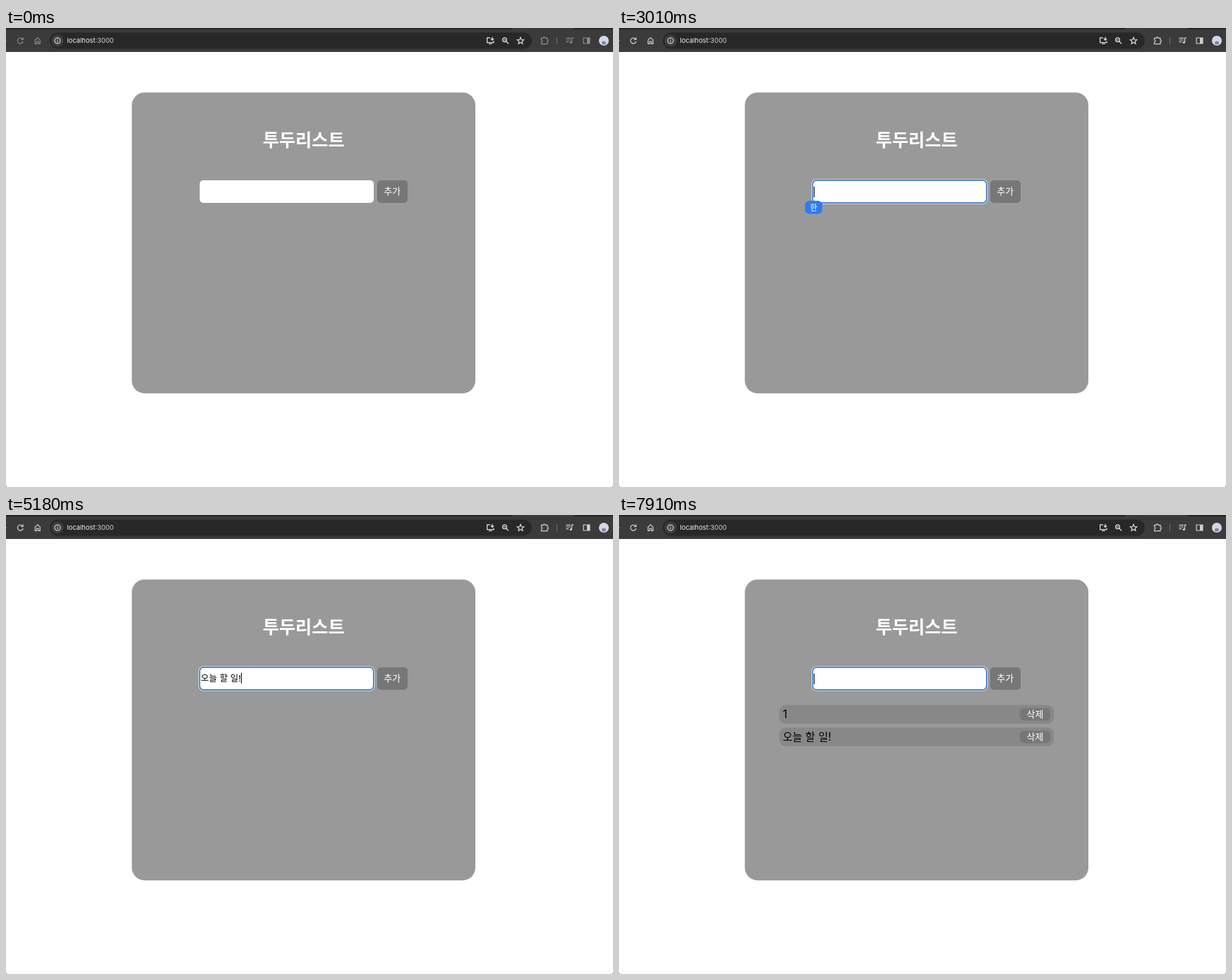
Write an HTML page with a canvas that moves like this. It is 860x651 px and loops after 8 s.

```html
<!DOCTYPE html>
<html lang="ko">
<head>
<meta charset="utf-8">
<title>투두리스트</title>
<style>
  html, body { margin: 0; width: 100%; height: 100%; overflow: hidden; background: #fff; }
  canvas { display: block; }
</style>
</head>
<body>
<canvas id="stage" width="860" height="651"></canvas>
<script>
const ctx = document.getElementById('stage').getContext('2d');
const LOOP = 8000;
const KOREAN = '"Noto Sans CJK KR", "Noto Sans CJK", sans-serif';
const ARIAL = '"Liberation Sans", Arial, sans-serif';
const INTER = 'Inter, sans-serif';

// Typing: [start ms, field text, is the last character being composed]
const typing = [
  [0, ''],
  [2240, 'dh'], [2450, 'dhsm'], [2590, 'dhs'], [2660, 'dh'], [2730, 'd'], [2800, ''],
  [3220, 'ㅇ', true], [3570, '오', true], [3780, '온', true], [3850, '오느', true],
  [3990, '오늘', true], [4060, '오늘'], [4130, '오늘 '], [4200, '오늘 ㅎ', true],
  [4270, '오늘 하', true], [4410, '오늘 할', true], [4620, '오늘 할 '],
  [4690, '오늘 할 ㅇ', true], [4760, '오늘 할 이', true], [4900, '오늘 할 일', true],
  [5180, '오늘 할 일!'], [5530, ''], [7560, '1'], [7910, '']
];
const caretOff = [[1400, 1960], [5740, 6230], [6790, 7280]];
const badges = [[1610, 2240, 'A'], [3010, 3220, '한']];
const during = t => ([from, to]) => t >= from && t < to;

function box(x, y, w, h, r, color) {
  ctx.fillStyle = color;
  ctx.beginPath();
  ctx.roundRect(x, y, w, h, r);
  ctx.fill();
}

function disc(x, y, r, color) {
  box(x - r, y - r, 2 * r, 2 * r, r, color);
}

function line(path, color, width = 1.2) {
  ctx.strokeStyle = color;
  ctx.lineWidth = width;
  ctx.stroke(new Path2D(path));
}

function label(text, x, y, font, color = '#fff', align = 'center') {
  ctx.font = font;
  ctx.fillStyle = color;
  ctx.textAlign = align;
  ctx.fillText(text, x, y);
}

// Mixed Hangul and Latin text; returns the left edge of every character and the end.
function mixed(text, x, y, size, latin) {
  const edges = [x];
  for (const ch of text) {
    const font = ch > '\u3000' ? `${size * 0.9375}px ${KOREAN}` : `${size}px ${latin}`;
    label(ch, x, y, font, '#000', 'left');
    edges.push(x += ctx.measureText(ch).width);
  }
  return edges;
}

function toolbar(active) {
  const tone = active ? '#d0d0d0' : '#8b8b8b';
  const light = '#e6e6e6';
  box(0, 0, 860, 34, 0, '#3b3b3b');
  box(0, 0, 718, 2, [0, 0, 2, 0], '#252525');
  box(805, 0, 55, 2, [0, 0, 0, 2], '#252525');
  box(62, 6.5, 683, 23, 11.5, '#282828');
  box(0, 17.4, 1, 1.2, 0, tone);

  // reload, home
  line('M23.6 15.6A4 4 0 1 0 24.3 19', tone);
  line('M24.2 13.4V16.4H21.2', tone);
  line('M41.2 16.9L44.7 13.8L48.2 16.9V22.3H45.9V19H43.5V22.3H41.2Z', tone);

  // page info and address
  disc(73, 18, 8.5, '#3e3e3e');
  line('M77 18A4 4 0 1 1 69 18A4 4 0 1 1 77 18M73 17.6V20.2M73 15.6V16.6', light, 1.1);
  label('localhost', 86.5, 21.2, '9.4px ' + INTER, '#f0f0f0', 'left');
  const end = 86.5 + ctx.measureText('localhost').width;
  label(':3000', end, 21.2, '9.4px ' + INTER, '#d2d2d2', 'left');

  // install, zoom, bookmark
  line('M686 13.8H681.6V20.6H691V18.4M684 22.5H688.6M689 12.8V17M686.9 15.2L689 17.3L691.1 15.2', light);
  line('M709.4 16.8A2.9 2.9 0 1 1 703.6 16.8A2.9 2.9 0 1 1 709.4 16.8M708.7 19L712 22.3M705.2 16.8H707.8', light);
  let star = '';
  for (let i = 0; i < 10; i++) {
    const r = i % 2 ? 2.2 : 5, a = i * Math.PI / 5;
    star += (i ? 'L' : 'M') + (729 + r * Math.sin(a)) + ' ' + (18.3 - r * Math.cos(a));
  }
  line(star + 'Z', light, 1.1);

  // extensions, divider, media, side panel
  line('M758.5 14.3H761.2A1.4 1.4 0 0 1 764 14.3H767V17A1.4 1.4 0 0 1 767 19.8V22.6H758.5V20A1.5 1.5 0 0 0 758.5 17Z', tone);
  box(780, 13, 1, 10, 0, '#707070');
  line('M793.5 14.3H800M793.5 17H800M793.5 19.7H797.2M801.6 20.4V14.2H804', tone);
  disc(800.3, 20.5, 1.6, tone);
  line('M818.2 14H827V22H818.2Z', tone);
  box(823, 14, 4, 8, 0, tone);

  // profile
  disc(847, 18, 7, '#d3d7e8');
  box(844, 18.5, 6, 5, [3, 3, 2, 2], '#7f86a0');
}

function field(t) {
  const focused = t >= 840;
  if (!focused) return box(274.5, 216, 246.5, 32, 5, '#fff');
  box(272.8, 214.4, 249.5, 35.2, 7, '#fff');
  box(273.7, 215.3, 247.7, 33.4, 6, '#1c62b3');
  box(275.1, 216.7, 244.9, 30.6, 4.7, '#fff');

  const [, text, composing] = typing.findLast(step => step[0] <= t);
  const rise = /[^\x00-\x7f]/.test(text) ? 1 : 0;
  const edges = mixed(text, 276, 237 - rise, 13.333, ARIAL);
  const end = edges.at(-1);
  if (composing) {
    const start = edges.at(-2);
    box(start, 238, end - start, 1, 0, '#000');
  }
  if (!caretOff.some(during(t))) box(Math.round(end - 0.1), 225 - rise, 1, 15, 0, '#000');
}

function item(text, y) {
  box(227, y, 389, 26.5, 9, '#888');
  mixed(text, 232, y + 18.5, 16, INTER);
  box(568, y + 4.5, 43, 17.5, 6, '#777');
  label('삭제', 589.5, y + 17.3, '500 13px ' + KOREAN);
}

function draw(now) {
  const t = now % LOOP;
  ctx.fillStyle = '#fff';
  ctx.fillRect(0, 0, 860, 651);
  toolbar(t >= 700);

  box(178.3, 91.5, 486.7, 426.7, 18, '#999');
  label('투두리스트', 421.7, 168, 'bold 25.2px ' + KOREAN);
  field(t);
  box(526, 216, 43, 32, 5, '#777');
  label('추가', 547.3, 236, '500 13px ' + KOREAN);

  const items = t >= 7910 ? ['1', '오늘 할 일!'] : t >= 5530 ? ['오늘 할 일!'] : [];
  items.forEach((text, i) => item(text, 269.5 + 32 * i));

  const badge = badges.find(during(t));
  if (badge) {
    box(263.5, 245, 24.5, 18.5, 6, '#2f7bf0');
    label(badge[2], 275.8, 258.5, '500 11px ' + (badge[2] === 'A' ? INTER : KOREAN));
  }

  // rounded window corners
  box(0, 650, 1, 1, 0, '#555');
  box(859, 650, 1, 1, 0, '#555');
  requestAnimationFrame(draw);
}
requestAnimationFrame(draw);
</script>
</body>
</html>
```
